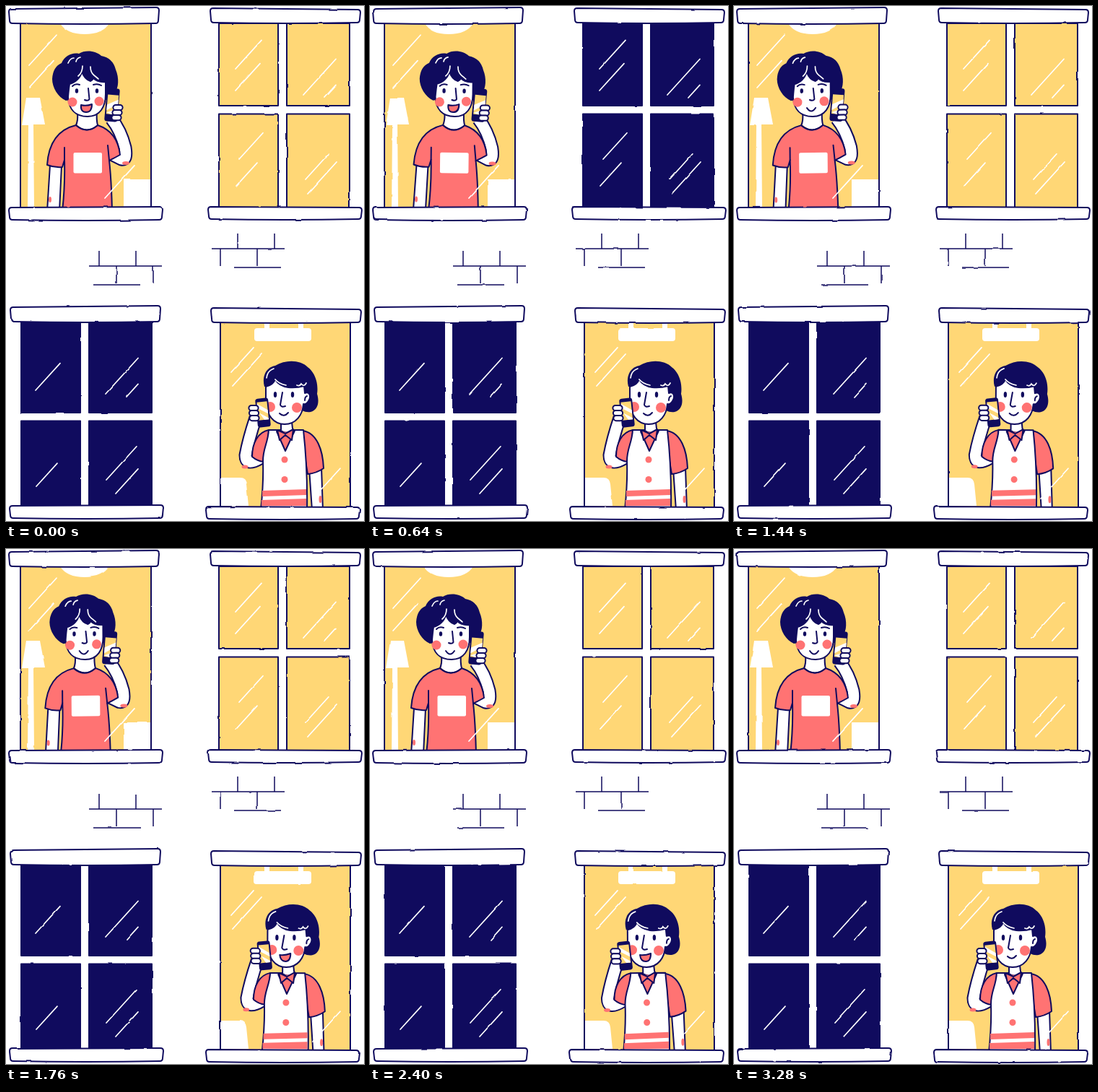
Write an HTML page that moves like this. It is 496x713 px and loops after 3.36 s.

```html
<!DOCTYPE html>
<html lang="en">
<head>
<meta charset="utf-8">
<title>Phone call between windows</title>
<style>
  html, body { margin: 0; width: 100%; height: 100%; overflow: hidden; background: #fff; }
  svg { display: block; width: 496px; height: 713px; }
  .ln { stroke: #100b5e; stroke-width: 2; stroke-linecap: round; stroke-linejoin: round; }
  .no { fill: none; }
  .w { fill: #fff; }
  .n { fill: #100b5e; }
  .y { fill: #ffd776; }
  .c { fill: #ff7373; }
  .shine { fill: none; stroke: #fff; stroke-width: 1.7; stroke-linecap: round; }
  .brick { fill: none; stroke: #100b5e; stroke-width: 1.5; }
  .dark .pane { fill: #100b5e; }
  .arm { fill: none; stroke: #100b5e; stroke-width: 19; stroke-linejoin: round; }
  .skin { stroke: #fff; stroke-width: 15; }
</style>
</head>
<body>
<svg viewBox="0 0 496 713">
  <defs>
    <filter id="rough" filterUnits="userSpaceOnUse" x="0" y="0" width="496" height="713" color-interpolation-filters="sRGB">
      <feTurbulence id="noise" type="fractalNoise" baseFrequency=".045" numOctaves="2" seed="1" result="t"/>
      <feDisplacementMap in="SourceGraphic" in2="t" scale="2.2" xChannelSelector="R" yChannelSelector="G"/>
    </filter>
    <clipPath id="manRoom"><rect x="20" y="22" width="182" height="260"/></clipPath>
    <clipPath id="womanRoom"><rect x="297" y="436" width="181" height="260"/></clipPath>
    <path id="manArm" d="M146 156Q159 172 165 196Q168 214 160 212L148 206"/>
    <path id="womanArm" d="M346 570Q336 600 332 622Q332 638 352 626"/>
  </defs>

  <g id="back" filter="url(#rough)">
    <rect class="ln y" x="20" y="22" width="181" height="258"/>
    <path class="w" d="M75 24H143Q134 39 109 39T75 24Z"/>
    <path class="w" d="M28 127H47L54 164H38L39 278H30L31 165H22Z"/>
    <rect class="w" x="163" y="240" width="37" height="39"/>
    <rect class="ln y" x="297" y="437" width="180" height="257"/>
    <path class="w" d="M358 438h7v10h-7zM405 438h7v10h-7z"/>
    <rect class="w" x="344" y="446" width="79" height="18" rx="4"/>
    <path class="w" d="M298 653H322Q332 652 333 662L336 692H298Z"/>
    <g id="panesTop"></g>
    <g id="panesLow" class="dark"></g>
  </g>

  <g clip-path="url(#manRoom)"><g id="man">
    <path class="ln w" d="M61 220L57 284H74L77 221Z"/>
    <ellipse class="c" cx="61" cy="268" rx="2" ry="4"/>
    <use href="#manArm" class="arm"/><use href="#manArm" class="arm skin"/>
    <ellipse class="c" cx="166" cy="217.500" rx="5" ry="2.500"/>
    <path class="ln c" d="M97 165C72 171 59 190 57 220Q67 224 78 223L81 213Q82 250 78 284H147Q146 240 143 214Q151 210 158 206C156 188 148 172 127 165Q112 178 97 165Z"/>
    <path class="ln no" d="M81 196V213M141 193L143 214"/>
    <rect class="w" x="93.500" y="203" width="39.500" height="28.500" rx="2"/>
    <path class="w" d="M99 144V165Q112 176 126 165V144Z"/>
    <path class="ln no" d="M99 148Q100 158 97 165Q112 178 127 165Q125 157 126 147"/>
    <path class="n" d="M83 131C72 126 64 113 64 101Q65 84 77 79C81 69 92 64 101 66C110 60 125 62 132 69Q148 72 152 88C157 100 156 113 151 120L140 130H88Z"/>
    <path class="ln w" d="M86 126Q87 114 88 108C96 106 103 100 105 91Q109 102 117 104Q120 103 121 100Q127 106 138 105V122C138 140 130 153 113 153S87 143 86 126Z"/>
    <path class="shine" d="M106 83Q106 92 100 97M117 84Q117 92 122 96T128 101M86 79Q89 72 94 72M97 77Q98 72 103 71"/>
    <circle class="c" cx="92" cy="133" r="6.500"/><circle class="c" cx="129" cy="132" r="6.500"/>
    <ellipse class="n" cx="98" cy="117.500" rx="2.200" ry="3.300"/><ellipse class="n" cx="126" cy="117.500" rx="2.200" ry="3.300"/>
    <path class="ln no" d="M92 111Q96 107 102 109M121 109Q127 107 132 110M114 114L115.500 129Q114 132 109 130"/>
    <path id="manOpen" class="ln c" d="M104 137Q111 139 119 136Q119 147 111 147T104 137Z"/>
    <path id="manShut" class="ln no" d="M105 141Q111 150 117 141"/>
    <g transform="translate(147 137) rotate(5)">
      <rect class="ln n" x="-8" y="-22" width="16" height="44" rx="2.500"/>
      <rect class="y" x="-7" y="-14" width="15" height="27"/>
      <path class="w" d="M-7 0L8-8v6L-7 8zM-7 11L8 5v3L0 13z"/>
    </g>
    <g id="manHand"></g>
  </g></g>

  <g clip-path="url(#womanRoom)"><g id="woman">
    <use href="#womanArm" class="arm"/><use href="#womanArm" class="arm skin"/>
    <ellipse class="c" cx="331" cy="638" rx="4.500" ry="2.500"/>
    <path class="ln w" d="M420 640L424 698H439L437 638Z"/>
    <ellipse class="c" cx="435.500" cy="683" rx="2" ry="5"/>
    <path class="ln c" d="M364 587C349 590 341 605 341 624Q348 630 357 631L363 600ZM411 588C431 591 439 615 440 640Q430 647 418 648L411 606Z"/>
    <path class="ln w" d="M364 587C363 605 356 612 356 630Q357 660 353 698H417Q418 640 412 587H376Z"/>
    <path class="c" d="M355 671L416 669V677L355 679ZM354 684L416 682V692H354Z"/>
    <path class="ln c" d="M375 589L387 616L400 588Z"/>
    <path class="w" d="M381 572H397V587Q389 592 381 587Z"/>
    <path class="ln no" d="M381 576V587M396 576L397 585"/>
    <path class="ln c" d="M376 587L387 592L398 586L396 601L387 594L379 601Z"/>
    <circle class="c" cx="386" cy="628" r="4.500"/><circle class="c" cx="386" cy="655.500" r="4.500"/>
    <path class="n" d="M358 527C354 512 361 500 373 498C388 489 408 490 418 500C429 508 433 524 431 537C435 550 431 560 422 562Q416 563 410 560L375 528Z"/>
    <path class="ln w" d="M360 527Q370 525 373 517Q378 526 391 528Q403 529 413 526L414 536C421 533 423 541 419 547Q416 552 412 551C411 566 402 579 386 579S361 565 360 550Z"/>
    <path class="ln no" d="M417 540Q414 541 414 546"/>
    <path class="shine" d="M361 515Q362 505 371 502M373 517Q378 523 388 525M403 525Q407 527 409 523Q413 528 416 522"/>
    <circle class="c" cx="366" cy="555" r="7"/><circle class="c" cx="403" cy="556" r="7"/>
    <ellipse class="n" cx="373" cy="538" rx="2.200" ry="4"/><ellipse class="n" cx="397" cy="538" rx="2.200" ry="4"/>
    <path class="ln no" d="M383 535L380 552Q381 556 387 554"/>
    <path id="womanOpen" class="ln c" d="M377 562Q384 563 392 560Q392 571 385 571T377 562Z"/>
    <path id="womanShut" class="ln no" d="M379 564Q385 570 391 563"/>
    <g transform="translate(356 563) rotate(-6)">
      <rect class="ln n" x="-8" y="-19" width="16" height="38" rx="2.500"/>
      <rect class="y" x="-7" y="-15" width="14" height="25"/>
      <path class="w" d="M-7-13L7-3v5L-7-7zM-5 0L7 8v2H1z"/>
    </g>
    <g id="womanHand"></g>
  </g></g>

  <g id="front" filter="url(#rough)"></g>
</svg>
<script>
const LOOP = 3360, STEP = 80;
const $ = id => document.getElementById(id);

function add(parent, cls, d) {
  const el = document.createElementNS('http://www.w3.org/2000/svg', 'path');
  el.setAttribute('class', cls);
  el.setAttribute('d', d);
  $(parent).append(el);
}

// Slanted reflection rising to the right
const streak = (parent, x, y, w) => add(parent, 'shine', `M${x} ${y}l${w} ${-1.1 * w}`);

// Two reflections, the second offset from the first
function streaks(parent, x, y, w, dx, dy, w2) {
  streak(parent, x, y, w);
  streak(parent, x + dx, y + dy, w2);
}

function panes(parent, x, y, split) {
  for (const left of [x, x + 94])
    for (const [top, bottom] of [[y, split], [split + 11.5, y + 255]])
      add(parent, 'ln y pane', `M${left} ${top}h${left > x ? 87 : 82}V${bottom}H${left}Z`);
  streaks(parent, x + 117, y + 99, 45, 29, 4, 16);
}

// Lintel or sill: a rounded bar with a slightly sloping top
function ledge(x, y, w, h, tilt) {
  const r = 4, side = h - 2 * r;
  add('front', 'ln w', `M${x + r} ${y}l${w - 2 * r} ${tilt}q${r} 0 ${r} ${r}l-1 ${side - tilt}q0 ${r} ${-r} ${r}`
    + `Q${x + w / 2} ${y + h + 2} ${x + r + 1} ${y + h}q${-r} 0 ${-r} ${-r}L${x} ${y + r}q0 ${-r} ${r} ${-r}Z`);
}

// Two courses with joints every 51 px
function bricks(x, y, up, down, low) {
  add('back', 'brick', `M${x} ${y}h101M${x + low} ${y + 26}h65`
    + [0, 51].map(k => `M${x + up + k} ${y}v-21M${x + down + k} ${y}v24`).join(''));
}

// Three fingers stacked down the phone
function hand(parent, x, y, lean) {
  for (let i = 0; i < 3; i++)
    add(parent, 'ln w', `M${x - 3 + i * lean} ${y + i * 7}h6a3.6 3.6 0 0 1 0 7.200h-6a3.6 3.6 0 0 1 0-7.200Z`);
}

panes('panesTop', 295, 24, 138);
streaks('panesTop', 318, 87, 36, 0, 30, 34);
streaks('panesTop', 323, 212, 33, -4, 37, 29);
streaks('panesTop', 415, 240, 32, 3, 20, 40);
panes('panesLow', 21, 438, 563);
streaks('panesLow', 41, 532, 34, 1, 133, 29);
streaks('panesLow', 139, 656, 42, 13, 19, 31);
streaks('back', 32, 82, 38, 0, 31, 34);
streaks('back', 312, 507, 31, 2, 19, 40);
streak('front', 137, 266, 41);
streak('front', 425, 682, 38);
bricks(115, 360, 14, 38, 6);
bricks(285, 336, 36, 12, 31);
hand('manHand', 155, 137, -1);
hand('womanHand', 343, 553, .5);

for (const [x, y, lintel, sill, tilt] of [
  [20, 24, -16, -16, -2], [295, 23, -12, -15, 2],
  [21, 437, -15, -16, -2], [297, 438, -13, -20, 2]]) {
  ledge(x + lintel, y - 20, 208, 20, tilt);
  ledge(x + sill, y + 255, 213, 17, tilt / 2);
}

// Each person sways once to both sides and talks for a while
const SWAY = 1760, TALK = 1280;
const people = [
  { id: 'man', sway: 240, talk: 0, angle: .6, pivot: '110 560' },
  { id: 'woman', sway: 1120, talk: 1680, angle: .4, pivot: '387 990' }
];

const during = (t, start, span) => t >= start && t < start + span;
const show = (id, on) => { $(id).style.display = on ? '' : 'none'; };

function pose({ id, sway, talk, angle, pivot }, t) {
  const lean = during(t, sway, SWAY) ? Math.sin(2 * Math.PI * (t - sway) / SWAY) : 0;
  const talking = during(t, talk, TALK);
  $(id).setAttribute('transform', `rotate(${angle * lean} ${pivot})`);
  show(id + 'Open', talking);
  show(id + 'Shut', !talking);
}

let last = -1;
function draw() {
  const step = Math.floor(performance.now() % LOOP / STEP);
  if (step !== last) {
    last = step;
    const t = step * STEP;
    people.forEach(p => pose(p, t));
    $('panesTop').classList.toggle('dark', during(t, 320, 960));
    $('noise').setAttribute('seed', step + 1);
  }
  requestAnimationFrame(draw);
}
draw();
</script>
</body>
</html>
```
